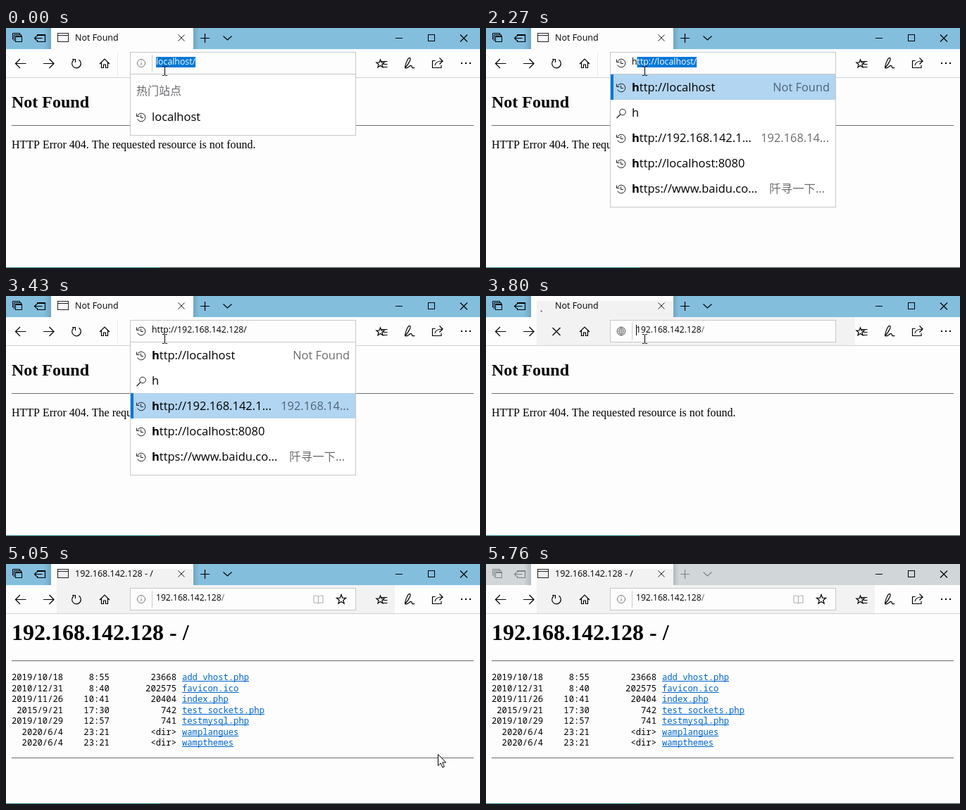
These frames come from a looping animation (673x341 px, 5.96 s). An HTML page with a canvas:

```html
<!DOCTYPE html>
<html lang="zh">
<head>
<meta charset="utf-8">
<title>Browser</title>
<style>
html, body { margin: 0; width: 100%; height: 100%; overflow: hidden; background: #fff; }
canvas { display: block; }
</style>
</head>
<body>
<canvas id="stage" width="673" height="341"></canvas>
<script>
const ctx = document.getElementById('stage').getContext('2d');
const LOOP = 5960;
const UI = '"Open Sans", "Noto Sans CJK SC", "Noto Sans CJK", sans-serif';
const SERIF = '"Liberation Serif", serif';
const MONO = '"Noto Sans Mono", monospace';
const BLUE = '#0078d7';

const files = [
  ['2019/10/18', '8:55', '23668', 'add_vhost.php'],
  ['2010/12/31', '8:40', '202575', 'favicon.ico'],
  ['2019/11/26', '10:41', '20404', 'index.php'],
  ['2015/9/21', '17:30', '742', 'test_sockets.php'],
  ['2019/10/29', '12:57', '741', 'testmysql.php'],
  ['2020/6/4', '23:21', '<dir>', 'wamplangues'],
  ['2020/6/4', '23:21', '<dir>', 'wampthemes']
];
const hints = [
  ['http://localhost', 'Not Found', 488],
  ['h', '阡寻 搜索', 488],
  ['http://192.168.142.1...', '192.168.14...', 487],
  ['http://localhost:8080', '', 488],
  ['https://www.baidu.co...', '阡寻一下...', 481]
];
// time, x, y of the pointer tip
const pointer = [
  [0, 225, 61], [4530, 262, 46], [4620, 380, 22], [4710, 500, 4], [4800, 540, 40],
  [4890, 565, 130], [4980, 588, 222], [5050, 613, 270], [5120, 632, 302],
  [5210, 640, 317], [5300, 648, 331], [5390, 660, 345]
];

function rect(x, y, w, h, color) {
  ctx.fillStyle = color;
  ctx.fillRect(x, y, w, h);
}
function frame(x, y, w, h, color) {
  ctx.strokeStyle = color;
  ctx.lineWidth = 1;
  ctx.strokeRect(x + .5, y + .5, w - 1, h - 1);
}
function line(d, color = '#000', width = 1.2) {
  ctx.strokeStyle = color;
  ctx.lineWidth = width;
  ctx.stroke(new Path2D(d));
}
function ring(x, y, r, color, from = 0, to = 2 * Math.PI, width = 1) {
  ctx.strokeStyle = color;
  ctx.lineWidth = width;
  ctx.beginPath();
  ctx.arc(x, y, r, from, to);
  ctx.stroke();
}
function dot(x, y, r, color) {
  ctx.fillStyle = color;
  ctx.beginPath();
  ctx.arc(x, y, r, 0, 7);
  ctx.fill();
}
function text(s, x, y, size, color = '#000', family = UI, weight = 400, align = 'left') {
  ctx.font = `${weight} ${size}px ${family}`;
  ctx.fillStyle = color;
  ctx.textAlign = align;
  ctx.fillText(s, x, y);
  return ctx.measureText(s).width;
}
function star(x, y, r) {
  let d = '';
  for (let i = 0; i < 10; i++) {
    const a = i * Math.PI / 5 - Math.PI / 2, q = i % 2 ? r * .42 : r;
    d += (i ? 'L' : 'M') + (x + q * Math.cos(a)) + ' ' + (y + q * Math.sin(a));
  }
  line(d + 'Z');
}
function shade(from, to) {
  const g = ctx.createLinearGradient(from, 0, to, 0);
  g.addColorStop(0, 'rgba(0,40,60,0)');
  g.addColorStop(1, 'rgba(0,40,60,.16)');
  rect(Math.min(from, to), 0, Math.abs(to - from), 30, g);
}

const icons = {
  clock(y) {
    ring(192, y, 5.8, '#222', -2.7, 2.7);
    line(`M185.5 ${y - 5.5}v4h4M191.5 ${y - 3.5}v4h3.5`, '#222', 1);
  },
  search(y, color = '#222') {
    ring(194, y - 1.5, 4.3, color);
    line(`M191 ${y + 1.5}l-5.500 5.500`, color);
  },
  info(y) {
    ring(192, y, 5.5, '#777');
    line(`M192 ${y - 1}v4M192 ${y - 3.5}v1.2`, '#777', 1);
  },
  globe(y) {
    ring(192, y, 6, '#666');
    line(`M186 ${y}h12M187 ${y - 3}h10M187 ${y + 3}h10M192 ${y - 6}v12` +
      `M192 ${y - 6}q-6 6 0 12M192 ${y - 6}q6 6 0 12`, '#666', .8);
  }
};

function titleBar(t, title, loading, gray) {
  const bar = t < 5670 ? '#84bedd' : t < 5760 ? '#abcbdb' : '#d1d6d9';
  const ink = t < 5670 ? '#000' : t < 5760 ? '#40484c' : '#808486';
  rect(0, 0, 673, 30, bar);
  shade(54, 64);
  shade(274, 266);
  rect(64, 0, 202, 30, '#fdfdfd');
  if (gray) rect(72, 7, 194, 23, '#f2f2f2');
  line('M9.5 16.5v-9h10v2M11.500 18.500v-9h10v2', ink, 1);
  frame(13, 11, 10, 9, ink);
  rect(13, 11, 10, 2, ink);
  line('M44.500 12v-2.500h11v10h-11V17M40.500 14.500h11M43.500 11.500l-3 3 3 3', ink);
  rect(44, 9, 12, 2, ink);
  if (loading) {
    const count = Math.min(5, 1 + Math.floor((t - 3800) / 90));
    for (let i = 0; i < count; i++) {
      const a = 1.9 + (t - 3800) / 130 - i * .5;
      dot(81 + 7 * Math.cos(a), 15 + 7 * Math.sin(a), 1.3, '#888');
    }
  } else {
    frame(73, 7, 16, 13, '#222');
    line('M73 10.5h16', '#222', 1);
  }
  text(title, 98, 18, 12.5);
  line('M244.5 9.5l9 9M253.5 9.5l-9 9', '#222', 1);
  line('M276 14.5h13M282.5 8v13', ink);
  line('M308.5 11.5l6 5.5 6-5.5', ink);
  line('M553 14.5h10', '#000', 1);
  line('M645 9.5l10 10M655 9.5l-10 10');
  frame(599, 9, 10, 10, '#000');
}

function toolbar(t, loading, loaded, gray) {
  rect(0, 30, 673, 40, '#fdfdfd');
  if (gray) rect(72, 30, t < 4800 ? 452 : 480, 40, '#f2f2f2');
  else rect(158, 34, 1, 36, '#ebebeb');
  rect(0, 70, 673, 1, '#d2d2d2');
  line('M13.500 50.500h15M20 44l-6.500 6.500 6.500 6.500');
  line('M53 50.500h15M61.500 44l6.500 6.500-6.500 6.500');
  if (loading) line('M94.5 45l11 11M105.5 45l-11 11');
  else {
    ring(100, 50.5, 6.3, '#000', -1, 4.1, 1.2);
    line('M94 44.500h4.500v4.500');
  }
  line('M133 51l7-7 7 7M135.500 49v7.500h3v-4.500h3v4.500h3V49');
  star(531.5, 51, 6);
  line('M533 47.500h8.500M535.500 51.500h6M535.500 55.500h6');
  line('M566.5 55.5c2-9 5-14 7-13s-1 8-7 14c4 2 7-4 9-3s-1 4 5 3');
  line('M609.500 46.500h-4v10h12.500v-3.500M609 53c.500-4 4-6 10.500-6M615.500 42.500l4.500 4.500-4.500 4.500');
  for (let i = 0; i < 3; i++) rect(646 + i * 6, 49, 2, 2, '#000');
  rect(176, 34, 321, 32, '#fdfdfd');
  frame(176, 34, 321, 32, '#c8c8c8');
  if (loaded) {
    line('M443.5 46q-3-1.5-6.5-1v10q3.5-.5 6.5 1 3-1.5 6.5-1v-10q-3.5-.5-6.5 1v10', '#aaa', 1);
    star(476, 50.5, 7);
  }
}

function page(listing) {
  rect(0, 71, 673, 269, '#fdfdfd');
  rect(8, listing ? 137 : 138, 656, 1, '#6e6e6e');
  if (!listing) {
    text('Not Found', 8, 113, 24, '#000', SERIF, 700);
    text('HTTP Error 404. The requested resource is not found.', 8, 171, 16, '#000', SERIF);
    return;
  }
  text('192.168.142.128 - /', 8, 108, 32, '#000', SERIF, 700);
  files.forEach(([date, time, size, name], i) => {
    const y = 165 + i * 15.55, row = date.padStart(10) + time.padStart(9) + size.padStart(13);
    text(row, 8, y, 12.2, '#000', MONO);
    const w = text(name, 250, y, 12.2, '#0066cc', MONO);
    rect(250, Math.round(y) + 1, w, 1, '#0066cc');
  });
  rect(8, 275, 656, 1, '#6e6e6e');
}

function selected(s, x) {
  ctx.font = `12.3px ${UI}`;
  rect(x, 41, ctx.measureText(s).width, 15, BLUE);
  text(s, x, 52, 12.3, '#fff');
}

function address(t) {
  const host = t < 2090 || t >= 3800;
  if (host) rect(207, 38, 1, 24, '#ccc');
  if (t < 2090) {
    icons.info(50);
    selected('localhost/', 213);
  } else if (t < 2270 || (t >= 3260 && t < 3430)) {
    icons.search(50, '#888');
    const w = text('h', 207, 52, 12.3);
    rect(Math.round(207 + w), 41, 1, 15, '#000');
  } else if (t < 3260) {
    icons.clock(50);
    const w = text('h', 207, 52, 12.3);
    selected('ttp://localhost/', 207 + w);
  } else if (t < 3800) {
    icons.clock(50);
    text('http://192.168.142.128/', 207, 52, 12.3);
  } else {
    (t < 4280 ? icons.globe : icons.info)(50);
    const w = text('192.168.142.128', 213, 52, 12.1);
    text('/', 213 + w, 52, 12.1, '#666');
    if (t < 4120) rect(213, 41, 1, 15, '#000');
  }
}

function dropdown(t) {
  const height = t < 2180 ? 88 : 190;
  rect(176, 65, 321, height, '#fff');
  frame(176, 65, 321, height, '#c8c8c8');
  if (t < 2180) {
    text('热门站点', 185, 95, 16, '#6b6b70');
    icons.clock(127);
    text('localhost', 207, 132, 16.5);
    return;
  }
  const active = t < 2270 ? -1 : t < 3260 ? 0 : t < 3430 ? 1 : 2;
  hints.forEach(([label, note, right], i) => {
    const top = 66 + i * 36, y = top + 24;
    if (i === active) {
      rect(177, top, 319, 36, '#b2d5f1');
      rect(177, top, 4, 36, BLUE);
    }
    (i === 1 ? icons.search : icons.clock)(top + 19);
    if (i === 1) text(label, 207, y, 16.5);
    else {
      const w = text('h', 207, y, 16.5, '#000', UI, 700);
      text(label.slice(1), 207 + w, y, 16.5);
    }
    if (i !== 1 || active === 1) {
      text(note, right, y, 16.4, i === active ? '#4f6375' : '#6b6b6b', UI, 400, 'right');
    }
  });
}

function cursor(t) {
  const [, x, y] = pointer.filter(p => p[0] <= t).pop();
  if (x < 497 && y > 36) {
    line(`M${x - 3} ${y - 6.5}h2.5l1 1 1-1h2.5M${x + .5} ${y - 6}v12` +
      `M${x - 3} ${y + 6.5}h2.5l1-1 1 1h2.5`, '#000', 1);
    return;
  }
  const arrow = new Path2D(`M${x + .5} ${y + .5}v16l3.7-3.5 2.6 6 2.5-1-2.6-6h5z`);
  ctx.fillStyle = '#fff';
  ctx.fill(arrow);
  ctx.strokeStyle = '#000';
  ctx.lineWidth = 1;
  ctx.stroke(arrow);
}

function draw(t) {
  const gray = t >= 3800, loading = gray && t < 4280, listing = t >= 4120;
  page(listing);
  titleBar(t, listing ? '192.168.142.128 - /' : 'Not Found', loading, gray);
  toolbar(t, loading, t >= 4280, gray);
  if (!gray) dropdown(t);
  address(t);
  rect(0, 340, 218, 1, '#2c8588');
  rect(218, 340, 455, 1, '#38504f');
  cursor(t);
}

const start = performance.now();
function tick() {
  draw((performance.now() - start) % LOOP);
  requestAnimationFrame(tick);
}
tick();
</script>
</body>
</html>
```
